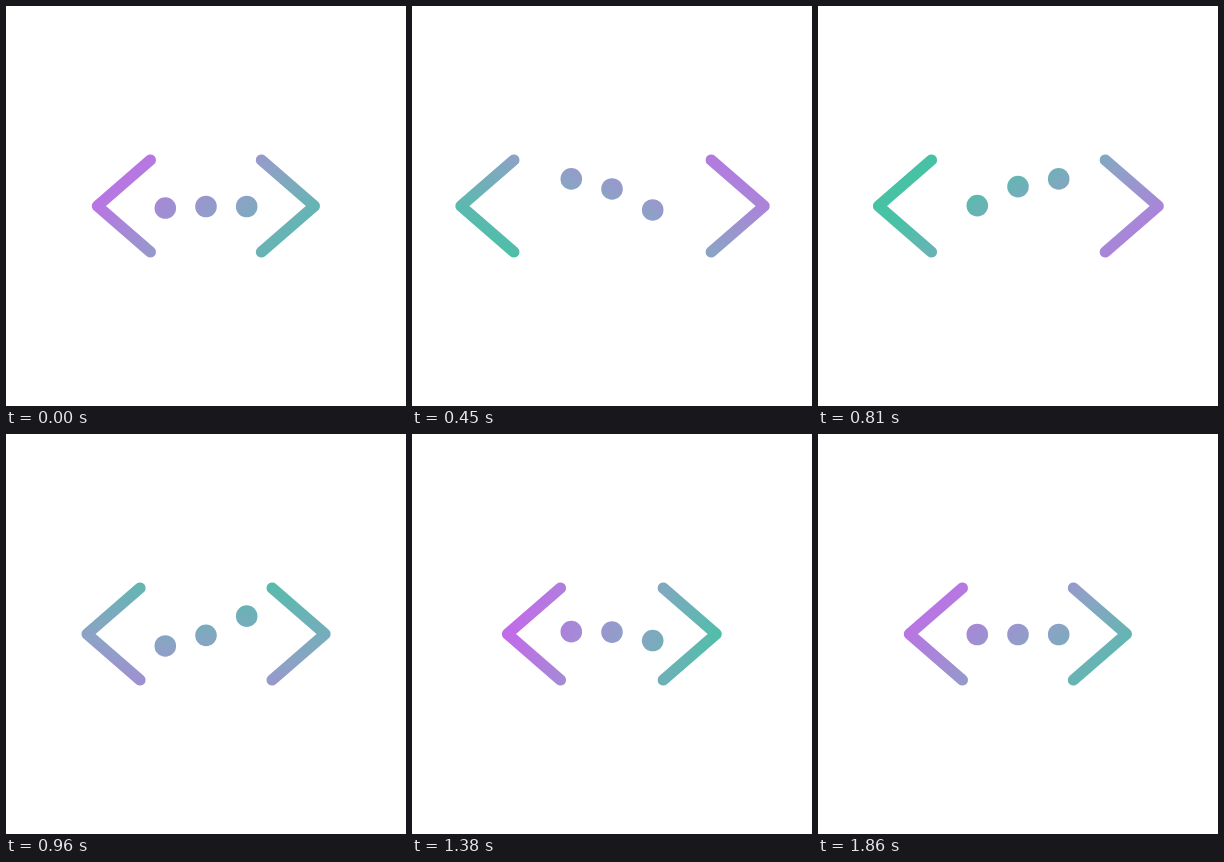
Write an HTML page with a canvas that moves like this. It is 400x400 px and loops after 3.89 s.

```html
<!DOCTYPE html>
<html lang="en">
<head>
<meta charset="utf-8">
<title>Code brackets loader</title>
<style>
  html, body { margin: 0; width: 100%; height: 100%; overflow: hidden; background: #fff; }
  canvas { display: block; width: 100vw; height: 100vh; }
</style>
</head>
<body>
<canvas id="stage"></canvas>
<script>
const SIZE = 400, MID = SIZE / 2, LOOP = 3890, ACTIVE = 1860, STEP = 30;
const DOT_GAP = 40.7, DOT_DELAY = 137, DOT_R = 10.8, DOT_Y = 200.5;

const canvas = document.getElementById('stage');
const ctx = canvas.getContext('2d');
const ratio = window.devicePixelRatio || 1;
canvas.width = canvas.height = SIZE * ratio;
ctx.scale(ratio, ratio);

const ease = p => (1 - Math.cos(Math.PI * p)) / 2;

// Eases through [time, value] poses, resting at each one.
function pose(poses, t) {
  const i = poses.findIndex(([time]) => time > t);
  if (i === 0) return poses[0][1];
  if (i < 0) return poses[poses.length - 1][1];
  const [t0, v0] = poses[i - 1], [t1, v1] = poses[i];
  return v0 + (v1 - v0) * ease((t - t0) / (t1 - t0));
}

// Brackets leave at speed, overshoot on the way back, then settle.
const spread = t => pose([[-600, -46], [600, 46], [1180, -6], [1700, 0]], t);

// A dot dips, jumps, hangs, lands low and settles.
const bounce = t => pose([[-60, 0], [120, 6.2], [425, -27.6], [550, -27.6],
  [970, 11.5], [1300, -3.5], [1580, 0]], t);

// One full turn of the gradient around an off-centre pivot.
function paint(t) {
  const turn = ease(1 - (1 - t / ACTIVE) ** 1.23);
  const a = (47 + 360 * turn) * Math.PI / 180;
  const shift = 26 * Math.cos(a - .6) - 8;
  const at = d => [MID + Math.cos(a) * d, MID + Math.sin(a) * d];
  const purple = 112, teal = 100;
  const g = ctx.createLinearGradient(...at(shift - purple), ...at(shift + teal));
  g.addColorStop(0, '#c06de8');
  g.addColorStop(purple / (purple + teal), '#8da2c6');
  g.addColorStop(1, '#48c2a5');
  return g;
}

function bracket(x, dir) {
  ctx.beginPath();
  ctx.moveTo(x, MID - 46);
  ctx.lineTo(x + dir * 53, MID);
  ctx.lineTo(x, MID + 46);
  ctx.stroke();
}

function draw(t) {
  ctx.fillStyle = '#fff';
  ctx.fillRect(0, 0, SIZE, SIZE);
  ctx.fillStyle = ctx.strokeStyle = paint(t);
  ctx.lineWidth = 11.2;
  ctx.lineCap = ctx.lineJoin = 'round';

  const s = spread(t);
  bracket(144.4 - s, -1);
  bracket(255.4 + s * 1.03, 1);

  for (let i = 0; i < 3; i++) {
    ctx.beginPath();
    ctx.arc(MID + (i - 1) * DOT_GAP, DOT_Y + bounce(t - i * DOT_DELAY), DOT_R, 0, Math.PI * 2);
    ctx.fill();
  }
}

const start = performance.now();
function tick() {
  const t = (performance.now() - start) % LOOP;
  draw(Math.min(Math.floor(t / STEP) * STEP, ACTIVE));
  requestAnimationFrame(tick);
}
tick();
</script>
</body>
</html>
```
